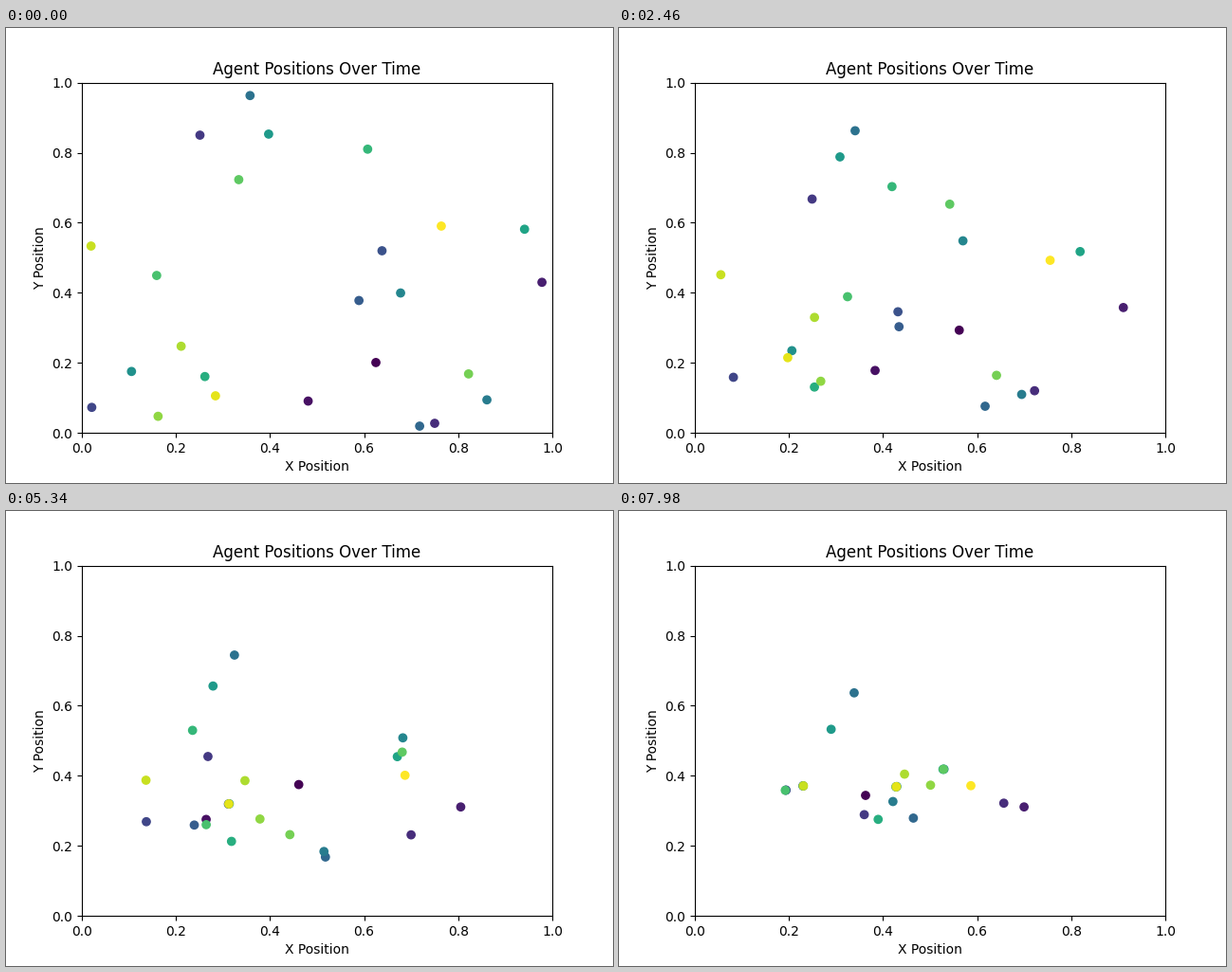
A matplotlib script for the animation above (8 s loop, 640x480 px).

```python
import numpy as np
import matplotlib.pyplot as plt
from matplotlib.animation import FuncAnimation

# Pursuit rule: every agent heads straight for its quarry at a steady speed.
# Start x, start y, speed, quarry; all later motion follows from the rule.
AGENTS = [
    (.625, .201, 2.73, 4), (.481, .091, 3.20, 22), (.978, .430, 2.42, 19),
    (.750, .0275, 2.37, 11), (.251, .850, 4.45, 15), (.021, .073, 2.57, 16),
    (.638, .520, 6.62, 23), (.589, .378, 4.20, 5), (.718, .0195, 2.83, 21),
    (.3575, .963, 2.485, 23), (.861, .0945, 4.08, 23), (.6775, .3995, 4.53, 18),
    (.1055, .1755, 2.865, 11), (.397, .853, 2.83, 4), (.941, .5815, 3.36, 5),
    (.2615, .161, 2.165, 20), (.6075, .810, 5.29, 22), (.159, .4495, 4.34, 7),
    (.3335, .723, 5.37, 14), (.822, .1685, 4.42, 23), (.162, .0475, 3.565, 11),
    (.211, .2475, 2.29, 18), (.0195, .5335, 2.19, 12), (.284, .106, 3.80, 12),
    (.764, .5905, 2.415, 19),
]
LOOP_MS, TICK_MS = 8000, 20
FRAMES = LOOP_MS // TICK_MS
HOLD = 3  # ticks between visible updates

x, y, speed, quarry = np.array(AGENTS).T
quarry = quarry.astype(int)
stride = speed / 1000 / HOLD


def chase(pos):
    gap = pos[quarry] - pos
    dist = np.hypot(*gap.T)
    reach = np.minimum(stride, dist) / np.maximum(dist, 1e-12)
    return pos + gap * reach[:, None]


track = [np.column_stack([x, y])]
for _ in range(FRAMES):
    track.append(chase(track[-1]))

fig, ax = plt.subplots(figsize=(6.4, 4.8), dpi=100)
dots = ax.scatter(x, y, c=np.arange(len(AGENTS)), cmap="viridis")
ax.set(xlim=(0, 1), ylim=(0, 1), xlabel="X Position", ylabel="Y Position",
       title="Agent Positions Over Time")


def draw(frame):
    dots.set_offsets(track[frame - frame % HOLD])
    return dots,


anim = FuncAnimation(fig, draw, frames=FRAMES, interval=TICK_MS,
                     repeat=True, repeat_delay=0)
plt.show()
```
